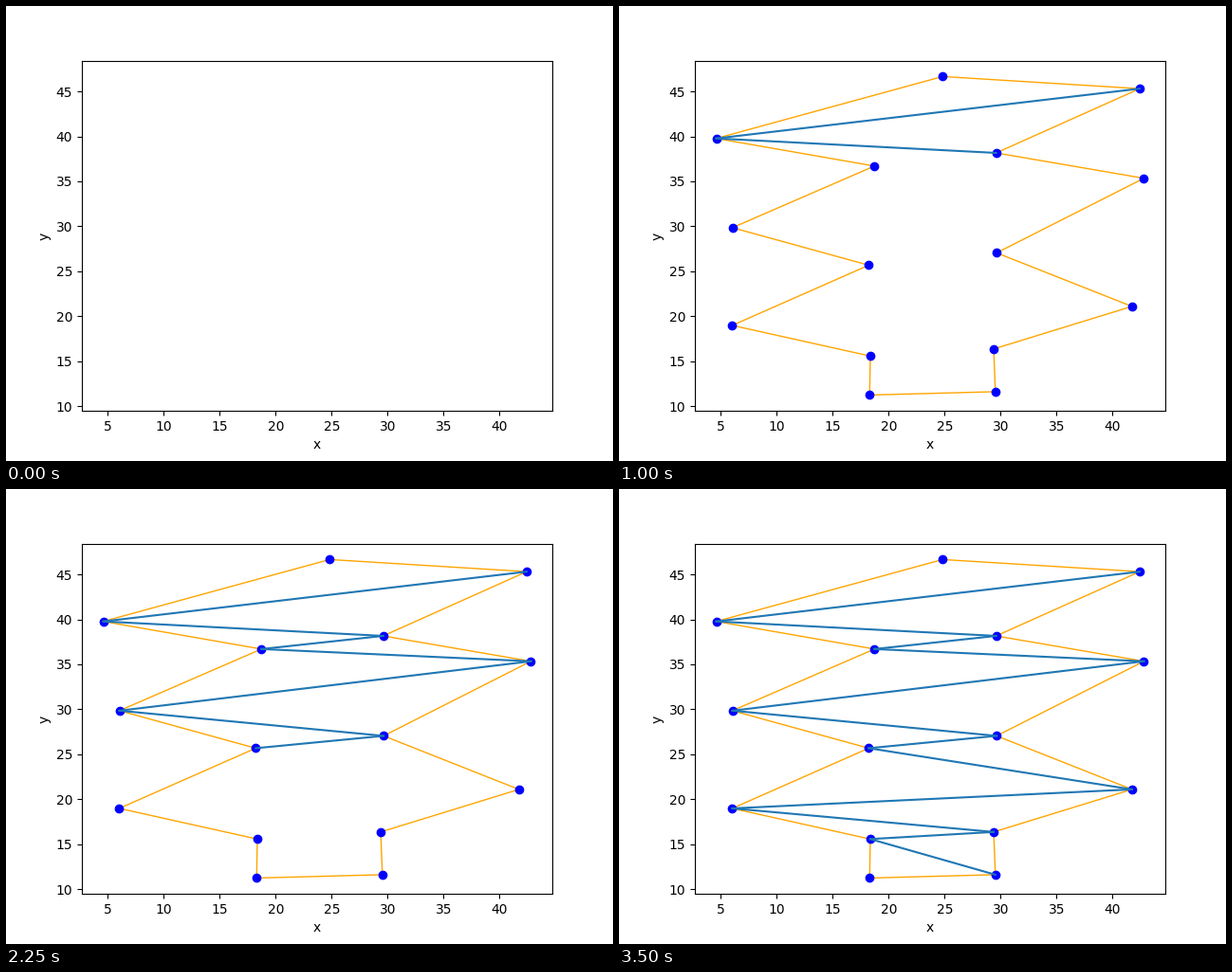
A matplotlib script that plays this animation: 640 px wide and 480 px high, repeating every 3750 ms.

```python
import matplotlib.pyplot as plt
from matplotlib.animation import FuncAnimation

# Vertices of a y-monotone polygon, as two chains from top to bottom
TOP, BOTTOM = (24.82, 46.65), (18.30, 11.25)
LEFT = [(4.60, 39.77), (18.73, 36.70), (6.04, 29.85), (18.22, 25.68),
        (6.03, 18.99), (18.36, 15.58)]
RIGHT = [(42.42, 45.30), (29.60, 38.16), (42.80, 35.34), (29.64, 27.05),
         (41.73, 21.10), (29.38, 16.37), (29.53, 11.62)]

polygon = [TOP, *LEFT, BOTTOM, *reversed(RIGHT)]

# The diagonals join neighbours in the sweep order
sweep = sorted(LEFT + RIGHT, key=lambda p: -p[1])
diagonals = list(zip(sweep, sweep[1:]))

plt.rcParams["font.family"] = "DejaVu Sans"
fig, ax = plt.subplots(figsize=(6.4, 4.8), dpi=100)
ax.set_xlabel("x")
ax.set_ylabel("y")


def draw(points, *fmt, **style):
    xs, ys = zip(*points)
    return ax.plot(xs, ys, *fmt, **style)[0]


steps = [draw(polygon + [TOP], color="orange", lw=1), draw(polygon, "bo")]
steps += [draw(d, color="C0", lw=1.5) for d in diagonals]


def update(frame):
    for i, artist in enumerate(steps):
        artist.set_visible(i < frame)
    return steps


anim = FuncAnimation(fig, update, frames=len(steps) + 1, interval=250,
                     init_func=lambda: update(0), repeat=True, repeat_delay=0)
plt.show()
```
